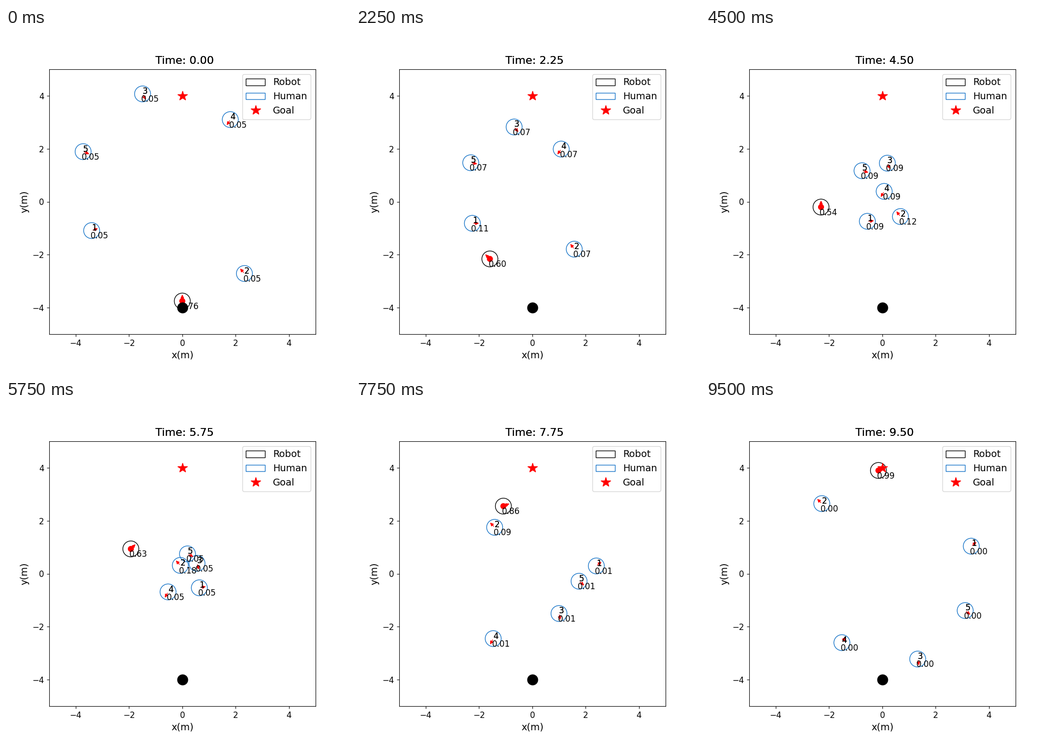
A matplotlib script for the animation above (9750 ms loop, 700 by 700 pixels).

```python
import numpy as np
import matplotlib.pyplot as plt
from matplotlib import patches
from matplotlib.animation import FuncAnimation
from matplotlib.lines import Line2D

STEP = 0.25
FRAMES = 39
TIMES = np.arange(FRAMES) * STEP
RADIUS = 0.3
BLUE = "#1875c8"

# Humans weave through the centre along waypoints, then head for their goals.
WAY_TIMES = np.array([0, 1.25, 3.25, 4.5, 6.75])
WAYPOINTS = [
    [(-3.40, -1.09), (-2.71, -.86), (-1.68, -.81), (-.56, -.74), (1.62, -.33)],
    [(2.33, -2.71), (1.85, -2.15), (1.27, -1.37), (.68, -.56), (-.72, 1.03)],
    [(-1.49, 4.07), (-1.08, 3.34), (-.27, 2.28), (.19, 1.455), (.815, -.52)],
    [(1.80, 3.10), (1.405, 2.46), (.705, 1.42), (.07, .39), (-1.01, -1.56)],
    [(-3.72, 1.89), (-2.955, 1.61), (-1.635, 1.355), (-.76, 1.17), (.98, .35)],
]
# Robot heading in degrees and the number of steps it is held.
ROBOT_RUNS = [(90, 1), (135, 13), (90, 7), (67.5, 2), (45, 1), (67.5, 2), (90, 2),
              (67.5, 2), (22.5, 2), (67.5, 3), (22.5, 1), (67.5, 2), (22.5, 1)]


def smooth(t, keys, points):
    """Cubic Hermite curve through the points."""
    slope = np.gradient(points, keys, axis=0)
    k = np.clip(np.searchsorted(keys, t, side="right") - 1, 0, len(keys) - 2)
    span = (keys[k + 1] - keys[k])[:, None]
    u = (t - keys[k])[:, None] / span
    return ((1 + 2 * u) * (1 - u) ** 2 * points[k]
            + u * (1 - u) ** 2 * span * slope[k]
            + u ** 2 * (3 - 2 * u) * points[k + 1]
            + u ** 2 * (u - 1) * span * slope[k + 1])


def human_path(points):
    """Weave, then walk to the mirrored start, brake there and turn back."""
    points = np.array(points)
    path = list(smooth(TIMES[TIMES <= WAY_TIMES[-1]], WAY_TIMES, points))
    goal = -points[0]
    while len(path) < FRAMES:
        gap = goal - path[-1]
        dist = np.hypot(*gap)
        if dist < 0.1:
            goal = -goal
            gap = goal - path[-1]
            dist = np.hypot(*gap)
        path.append(path[-1] + gap / dist * STEP * min(1, 1.5 * dist))
    return np.array(path)


def path_angles(path):
    move = np.diff(path, axis=0)
    move = np.vstack([move[:1], move])
    return np.arctan2(move[:, 1], move[:, 0])


def bump(height, center, width):
    return height * np.exp(-((TIMES - center) / width) ** 2)


def attention():
    """Weights of the humans; two of them stand out when the robot passes."""
    shared = np.interp(TIMES, [0, 1.25, 4.5, 6.75, 9.5], [.047, .068, .085, .021, 0])
    weights = np.tile(shared, (len(WAYPOINTS), 1))
    weights[0] += bump(.04, 1.8, 1.1)
    weights[1] += bump(.15, 6.4, 1.6)
    return weights


class Agent:
    def __init__(self, ax, path, angles, scores, color, label=None):
        self.path, self.angles, self.scores = path, angles, scores
        self.body = ax.add_patch(
            patches.Circle((0, 0), RADIUS, fill=False, color=color))
        style = patches.ArrowStyle("-|>", head_length=4, head_width=2)
        self.arrow = ax.add_patch(
            patches.FancyArrowPatch((0, 0), (0, RADIUS), color="red", arrowstyle=style))
        self.score = ax.text(0, 0, "", fontsize=12)
        self.dot = self.label = None
        if label:
            self.label = double_text(ax, 0, 0, label, fontsize=12)
        else:
            self.dot = ax.add_patch(patches.Circle((0, 0), 0.1, color="red"))

    def update(self, i):
        x, y = self.path[i]
        angle = self.angles[i]
        self.body.center = x, y
        self.arrow.set_positions(
            (x, y), (x + RADIUS * np.cos(angle), y + RADIUS * np.sin(angle)))
        self.score.set_position((x - 0.05, y - 0.3))
        self.score.set_text(f"{self.scores[i]:.2f}")
        if self.label:
            self.label.set_position((x, y))
        if self.dot:
            self.dot.center = x, y


def double_text(ax, *args, **kwargs):
    """Text that is painted twice, which gives it heavier edges."""
    text = ax.text(*args, **kwargs)
    ax.add_artist(text)
    return text


def marker(x, y, shape, color):
    return Line2D([x], [y], color=color, marker=shape, linestyle="None", markersize=15)


fig, ax = plt.subplots(figsize=(7, 7), dpi=100)
ax.set_xlim(-5, 5)
ax.set_ylim(-5, 5)
ax.tick_params(labelsize=12)
ax.set_xlabel("x(m)", fontsize=14)
ax.set_ylabel("y(m)", fontsize=14)

ax.add_artist(marker(0, -4, "o", "black"))
goal = marker(0, 4, "*", "red")
ax.add_artist(goal)

weights = attention()
robot_angles = np.radians(np.repeat(*np.transpose(ROBOT_RUNS).tolist())
                          if False else
                          np.concatenate([[deg] * n for deg, n in ROBOT_RUNS]))
robot_moves = STEP * np.column_stack([np.cos(robot_angles), np.sin(robot_angles)])
robot_path = np.array([0, -4]) + np.cumsum(robot_moves, axis=0)
robot_scores = np.minimum(0.99, 1 - weights.sum(axis=0))
robot = Agent(ax, robot_path, robot_angles, robot_scores, "black")

humans = []
for n, points in enumerate(WAYPOINTS):
    path = human_path(points)
    humans.append(Agent(ax, path, path_angles(path), weights[n], BLUE, str(n + 1)))

ax.legend([robot.body, humans[0].body, goal], ["Robot", "Human", "Goal"],
          loc="upper right", fontsize=14)
clock = double_text(ax, 0.4, 1.02, "", fontsize=16, transform=ax.transAxes)


def update(i):
    for agent in [robot] + humans:
        agent.update(i)
    clock.set_text(f"Time: {TIMES[i]:.2f}")
    return []


anim = FuncAnimation(fig, update, frames=FRAMES, interval=250, repeat=True,
                     repeat_delay=0, init_func=lambda: update(0))
plt.show()
```
